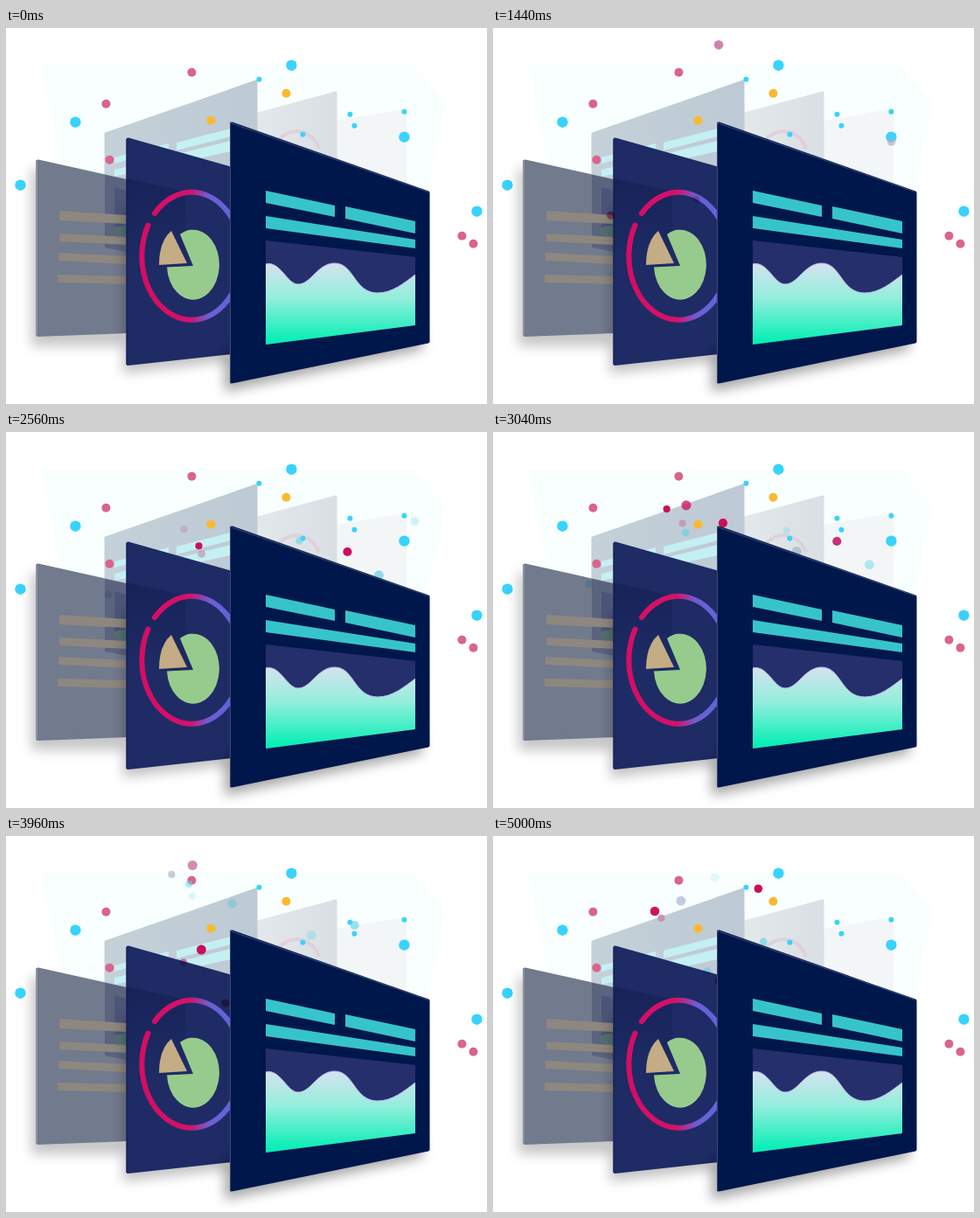
Recreate the animation shown at these times as an HTML page. Size 550 by 430 pixels, loop 5040 ms.

```html
<!DOCTYPE html>
<html lang="en">
<head>
<meta charset="utf-8">
<title>Floating dashboards</title>
<style>
html, body { margin: 0; width: 100%; height: 100%; overflow: hidden; background: #fff; }
svg { display: block; width: 550px; height: 430px; }
#through { mix-blend-mode: multiply; opacity: .55; }
</style>
</head>
<body>
<svg id="stage" viewBox="0 0 550 430" xmlns="http://www.w3.org/2000/svg">
  <defs>
    <linearGradient id="back" x1="0" y1="0" x2="1" y2="0">
      <stop offset="0" stop-color="#c5d1d8"/>
      <stop offset="1" stop-color="#bdc9d4"/>
    </linearGradient>
    <linearGradient id="mid" x1="0" y1="0" x2="1" y2="0">
      <stop offset="0" stop-color="#e3e8eb"/>
      <stop offset="1" stop-color="#d9dfe4"/>
    </linearGradient>
    <linearGradient id="shade" x1="0" y1="0" x2="0" y2="1">
      <stop offset="0" stop-color="#0a1440" stop-opacity=".35"/>
      <stop offset="1" stop-color="#0a1440" stop-opacity="0"/>
    </linearGradient>
    <linearGradient id="ring" gradientUnits="userSpaceOnUse" x1="155" y1="0" x2="262" y2="0">
      <stop offset="0" stop-color="#d60d63"/>
      <stop offset=".52" stop-color="#d3126c"/>
      <stop offset=".72" stop-color="#6e5ed2"/>
      <stop offset="1" stop-color="#5f64dc"/>
    </linearGradient>
    <linearGradient id="sea" gradientUnits="userSpaceOnUse" x1="0" y1="268" x2="0" y2="358">
      <stop offset="0" stop-color="#d6e2ef"/>
      <stop offset=".45" stop-color="#94eedc"/>
      <stop offset="1" stop-color="#06efb5"/>
    </linearGradient>
    <filter id="blur" x="-20%" y="-20%" width="140%" height="140%">
      <feGaussianBlur stdDeviation="7"/>
    </filter>
    <clipPath id="panel"><path d="M138 125L257 158V372L138 386Z"/></clipPath>
    <clipPath id="cards"><path d="M34 150L138 173V125L257 158V372L138 386V349L34 353Z"/></clipPath>
  </defs>

  <rect width="550" height="430" fill="#fff"/>
  <path d="M40 42H465L503 85L480 190H70Z" fill="#f9fffe"/>

  <g stroke-linejoin="round">
    <path d="M378 106L458 92V190H378Z" fill="#f3f6f7"/>
    <path d="M288 98L377 74V170H288Z" fill="url(#mid)" stroke="url(#mid)" stroke-width="3"/>
    <path d="M309 132A28 32 0 0 1 358 138" fill="none" stroke="#dfd0db" stroke-width="4"/>
    <path d="M114 121L286 61V245L114 252Z" fill="url(#back)" stroke="url(#back)" stroke-width="3"/>
    <g fill="#c5f0f3">
      <path d="M124 148L186 132V139L124 155Z"/>
      <path d="M195 131L257 115V124L195 140Z"/>
      <path d="M124 162L257 129V141L124 170Z"/>
    </g>
  </g>

  <g id="dots" transform="translate(.4 .7)"></g>
  <g id="sparks"></g>

  <g stroke-linejoin="round">
    <path d="M34 154L140 177V358H34Z" transform="translate(-5 6)" opacity=".22" filter="url(#blur)"/>
    <path d="M36.500 153L205 190.500V344L36.500 350.500Z" fill="#727a8d" stroke="#727a8d" stroke-width="5"/>
    <path d="M35 152V351" stroke="#8c94a3" stroke-width="2"/>
    <path d="M113 168L138 173.500V256L113 251Z" fill="#5a647e"/>
    <path d="M124 182L138 186V242L124 236Z" fill="#4c5578"/>
    <path d="M124 228L138 225V242L124 236Z" fill="#557070"/>
    <g fill="#8d877f">
      <path d="M61 209L138 214V224L61 220Z"/>
      <path d="M61 235L138 239V248L61 244Z"/>
      <path d="M60 257L138 261V270L60 266Z"/>
      <path d="M59 282L138 284V293L59 291Z"/>
    </g>

    <path d="M138 200L260 200V374L138 388Z" transform="translate(-4 7)" opacity=".24" filter="url(#blur)"/>
    <path d="M139.500 127.500L258 161V371L139.500 384Z" fill="#1e2b65" stroke="#1e2b65" stroke-width="4"/>
    <path d="M138.500 127V385" stroke="#17245c" stroke-width="2"/>
    <path d="M138 172L205 187V270H138Z" fill="url(#shade)"/>
    <path d="M170 212A57 73 0 1 1 162.500 225.500" clip-path="url(#panel)" fill="none" stroke="url(#ring)" stroke-width="6" stroke-linecap="round"/>
    <path d="M199 236A30 40 0 1 1 184 273.500L214 272Z" fill="#97cb8d"/>
    <path d="M189 232L207 269L175 271Q175 244 189 232Z" fill="#c4ad84"/>
  </g>

  <g id="through"><g clip-path="url(#cards)"><use href="#sparks"/></g></g>

  <g stroke-linejoin="round">
    <path d="M250 365L476 335V362L250 410Z" transform="translate(0 6)" opacity=".34" filter="url(#blur)"/>
    <path d="M258 109.500L482.500 188.500V358.500L258 404.500Z" fill="#00174b" stroke="#00174b" stroke-width="4"/>
    <path d="M256.500 405V108.500L483 187.500" fill="none" stroke="#3c4b76"/>
    <g fill="#36c4ca">
      <path d="M297 186L376 203V216L297 200Z"/>
      <path d="M388 204L468 221V235L388 218Z"/>
      <path d="M297 215L468 242V252L297 229Z"/>
    </g>
    <path d="M297 243L468 262V340L297 362Z" fill="#252f6b"/>
    <path d="M297 270C314 266 321 293 334 293C349 293 356 269 376 269C398 269 398 303 425 303C442 303 456 291 468 282V340L297 362Z" fill="url(#sea)"/>
    <path d="M297 270C314 266 321 293 334 293C349 293 356 269 376 269C398 269 398 303 425 303C442 303 456 291 468 282" fill="none" stroke="#bdb9ea"/>
  </g>
</svg>
<script>
const LOOP = 5.04, LIFE = 3, GAP = .25;
const NS = "http://www.w3.org/2000/svg";

function circle(parent, x, y, r, fill) {
  const c = document.createElementNS(NS, "circle");
  const attrs = { cx: x, cy: y, r, fill };
  for (const k in attrs) c.setAttribute(k, attrs[k]);
  return document.getElementById(parent).appendChild(c);
}

function confetti(fill, r, spots) {
  for (const [x, y] of spots) circle("dots", x, y, r, fill);
}
confetti("#38d3fc", 6.2, [[326, 42], [79, 107], [16, 179], [455, 124], [538, 209]]);
confetti("#38d3fc", 3, [[289, 58], [393, 98], [398, 111], [339, 121], [455, 95]]);
confetti("#d9648d", 5, [[212, 50], [114, 86], [118, 150], [521, 237], [534, 246]]);
confetti("#fbb92f", 5, [[320, 74], [234, 105]]);

// Where each spark is one second after its birth; births are GAP apart
const path = [
  [451, 141], [259, 25], [334, 151], [420, 184], [126, 200], [226, 155], [346, 150],
  [219, 120], [393, 126], [262, 98], [194, 66], [215, 45], [310, 146], [249, 181],
  [219, 101], [195, 106], [185, 86], [303, 54], [255, 150]
];

// Sparks fan out from the middle and rise fastest in a plume on the left
const sparks = path.map(([x, y], i) => ({
  x, y,
  born: i * GAP,
  vx: (x - 320) * .08,
  vy: -25 - 30 * Math.exp(-(((x - 212) / 35) ** 2)),
  el: circle("sparks", x, y, 4.8 + .8 * Math.sin(i * 2.4), "none")
}));

// Share of life, colour, opacity
const crimson = [203, 14, 91], lilac = [190, 160, 190], teal = [100, 215, 230];
const ramp = [
  [0, crimson, 0], [.13, crimson, 1], [.33, crimson, 1],
  [.45, lilac, .6], [.62, teal, .75], [1, teal, 0]
];
const mix = (a, b, k) => a + (b - a) * k;

function tint(p) {
  const i = Math.max(1, ramp.findIndex(s => s[0] >= p));
  const [p0, c0, a0] = ramp[i - 1], [p1, c1, a1] = ramp[i];
  const k = (p - p0) / (p1 - p0);
  return `rgba(${c0.map((v, n) => Math.round(mix(v, c1[n], k)))},${mix(a0, a1, k)})`;
}

function draw(t) {
  for (const s of sparks) {
    const age = t - s.born, p = age / LIFE;
    s.el.setAttribute("fill", p >= 0 && p < 1 ? tint(p) : "none");
    s.el.setAttribute("cx", s.x + s.vx * (age - 1));
    s.el.setAttribute("cy", s.y + s.vy * (age - 1));
  }
}

const start = performance.now();
function tick() {
  const t = ((performance.now() - start) / 1000) % LOOP;
  draw(Math.floor(t * 25) / 25);
  requestAnimationFrame(tick);
}
tick();
</script>
</body>
</html>
```
